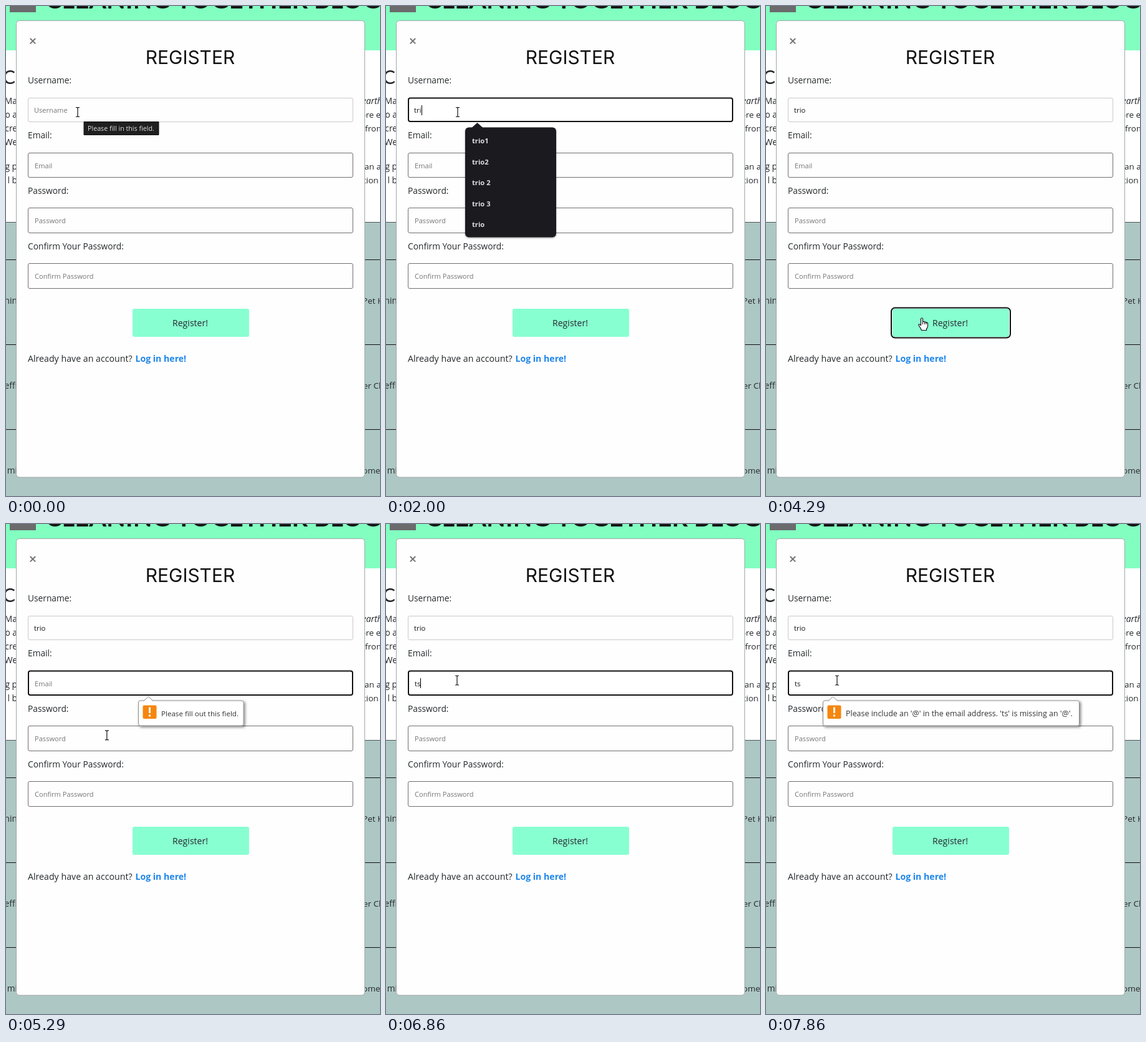
Write an HTML page with a canvas that moves like this. It is 600 px wide and 785 px high and loops after 8000 ms.

```html
<!DOCTYPE html>
<html lang="en">
<head>
<meta charset="utf-8">
<title>Register form</title>
<style>
  html, body { margin: 0; width: 100%; height: 100%; overflow: hidden; background: #fff; }
  canvas { display: block; width: 600px; height: 785px; }
</style>
</head>
<body>
<canvas id="stage" width="600" height="785"></canvas>
<script>
const ctx = document.getElementById('stage').getContext('2d');
const LOOP = 8000;
const TICKS_PER_SECOND = 7;
const BODY = '"Open Sans", "Noto Sans", sans-serif';
const HEADING = 'Lato, sans-serif';
const INK = '#24282b';

// Schedule in ticks
const FOCUS_NAME = 1, OPEN_NAMES = 2, PRESS = 29, SUBMIT = 31;
const OPEN_MAILS = 42, RESUBMIT = 49;
const NAME_KEYS = [11, 12, 14, 15], MAIL_KEYS = [45, 47];
const NAME = 'trio', MAIL = 'ts';
const MOUSE = [
  [0, 115, 170], [18, 115, 170], [21, 121, 512], [23, 130, 513],
  [25, 130, 513], [28, 250, 500], [34, 250, 500], [39, 114, 250.5]
];

const NAMES = ['TameldaC', 'trio1', 'DFenwold', 'LNova', 'trio2', 'KBrond', 'trio 2', 'trio 3', 'trio'];
const MAILS = ['trio1@t.example', 'tamelda.crawholt52@m.example', 'trio2@t.example',
  'trio3@t.example', 'dfenwold@t.example'];

const FIELDS = [
  { label: 'Username:', hint: 'Username', y: 147, h: 39, labelY: 124, border: '#c9c9c9' },
  { label: 'Email:', hint: 'Email', y: 235, h: 40, labelY: 212, border: '#707070' },
  { label: 'Password:', hint: 'Password', y: 323, h: 41, labelY: 301, border: '#707070' },
  { label: 'Confirm Your Password:', hint: 'Confirm Password', y: 412, h: 41, labelY: 389.5, border: '#707070' }
];

function text(str, x, y, size, { color = INK, weight = '400', family = BODY, align = 'left', spacing = 0 } = {}) {
  ctx.font = `${weight} ${size}px ${family}`;
  ctx.letterSpacing = spacing + 'px';
  ctx.textAlign = align;
  ctx.fillStyle = color;
  ctx.fillText(str, x, y);
}

function rect(x, y, w, h, color) {
  ctx.fillStyle = color;
  ctx.fillRect(x, y, w, h);
}

function box(x, y, w, h, r, fill, stroke, line = 1) {
  const inset = stroke ? line / 2 : 0;
  ctx.beginPath();
  ctx.roundRect(x + inset, y + inset, w - 2 * inset, h - 2 * inset, r);
  paint(fill, stroke, line);
}

function shape(points, fill, stroke, line = 1) {
  ctx.beginPath();
  points.forEach(([x, y]) => ctx.lineTo(x, y));
  ctx.closePath();
  paint(fill, stroke, line);
}

function paint(fill, stroke, line) {
  if (fill) { ctx.fillStyle = fill; ctx.fill(); }
  if (stroke) { ctx.strokeStyle = stroke; ctx.lineWidth = line; ctx.stroke(); }
}

function withShadow(color, blur, dx, dy, draw) {
  ctx.save();
  Object.assign(ctx, { shadowColor: color, shadowBlur: blur, shadowOffsetX: dx, shadowOffsetY: dy });
  draw();
  ctx.restore();
}

function drawPage() {
  rect(0, 0, 600, 785, '#fff');
  rect(0, 0, 600, 71, '#82ffc0');
  rect(6, 0, 42, 10, '#6b6a6c');
  text('CLEANING TOGETHER BLOG', 63, 3.5, 40, { weight: '700', family: HEADING, color: '#151515' });
  rect(0, 346, 600, 439, '#adc7c4');
  [346, 406, 542, 678].forEach(y => rect(0, y, 600, 1, y === 346 ? '#4a5553' : '#111'));

  text('C', -5, 125, 30, { family: HEADING });
  const left = [['Ma', 157], ['o a', 179], ['cre', 201], ['We', 223], ['g p', 262], ['l b', 284],
    ['nin', 477], ['effi', 613], ['mi', 749]];
  left.forEach(([s, y]) => text(s, 18, y, 13.8, { align: 'right' }));
  text('earth', 571, 157, 13.8, { weight: 'italic 400' });
  const right = [['ore e', 569, 179], ['from', 576, 201], ['an a', 575, 262], ['tion', 573, 284],
    ['Pet H', 572, 477], ['er Cl', 573, 613], ['ome', 572, 749]];
  right.forEach(([s, x, y]) => text(s, x, y, 13.5));
}

function drawModal() {
  box(16, 23, 560, 732.5, 5, '#fefefe', '#9fa8a6');
  ctx.beginPath();
  ctx.moveTo(38.8, 52); ctx.lineTo(47.2, 60.4);
  ctx.moveTo(47.2, 52); ctx.lineTo(38.8, 60.4);
  paint(null, '#747474', 2);
  text('REGISTER', 295.5, 92.5, 30, { family: 'Inter, sans-serif', align: 'center', color: '#111' });
  text('Already have an account?', 35, 570, 14.2);
  text('Log in here!', 207.5, 570, 14.1, { weight: '700', color: '#1f86ea' });
}

function drawField(field, value, focused, caret) {
  const { y, h } = field;
  const x = field === FIELDS[0] ? 45 : 46;
  const base = y + h / 2 + 4.5;
  text(field.label, 35, field.labelY, 13.75);
  if (focused) box(35, y - 0.5, 522, h + 0.5, 3, '#fff', '#111', 2);
  else box(35, y, 522, h, 2.5, '#fefefe', field.border);
  if (value) text(value, x, base, 11.4, { color: '#161616' });
  else text(field.hint, x, base, 11.1, { color: '#777' });
  if (caret) {
    ctx.font = `400 11.4px ${BODY}`;
    rect(Math.round(x + ctx.measureText(value).width), y + 12, 1, 16, '#000');
  }
}

function drawButton(pressed) {
  if (pressed) box(200, 482.5, 193, 50, 6, '#fff', '#111', 2);
  box(203, 485, 187, 45, 3, '#88ffd1');
  text('Register!', 295.5, 513, 14.1, { align: 'center' });
}

function drawTooltip() {
  box(124.5, 185, 121, 22, 0, '#1f1f1f', '#111');
  text('Please fill in this field.', 131, 200, 10.7, { color: '#e0e0e0' });
}

function drawSuggestions(items, top, width) {
  if (!items.length) return;
  const row = 33.6;
  withShadow('rgba(0,0,0,.4)', 3, 0, 1, () => box(127, top, width, items.length * row + 8, 6, '#1b1a1f'));
  shape([[137, top + 1], [146.5, top - 7.5], [156, top + 1]], '#1b1a1f');
  items.forEach((item, i) =>
    text(item, 138, top + 25.5 + i * row, 11.2, { weight: '700', color: '#dedee0' }));
}

function drawBubble(message, left, right, size, alpha) {
  const top = 282.5, tip = left + 16.5;
  ctx.save();
  ctx.globalAlpha = alpha;
  withShadow('rgba(0,0,0,.5)', 4, 2, 2, () => box(left, top, right - left, 41, 3, '#fff'));
  box(left, top, right - left, 41, 3, '#fff', '#8e8e8e');
  shape([[tip - 7, top + 1.5], [tip, top - 6], [tip + 7, top + 1.5]], '#fff');
  ctx.beginPath();
  ctx.moveTo(tip - 7, top + 0.5); ctx.lineTo(tip, top - 6); ctx.lineTo(tip + 7, top + 0.5);
  paint(null, '#8e8e8e', 1);
  box(left + 7.5, 290.5, 22, 21.5, 2, '#f5860f');
  rect(left + 17, 293.5, 3, 9.5, '#fff');
  rect(left + 17, 305.5, 3, 3, '#fff');
  text(message, left + 37, 307.5, size, { color: '#333' });
  ctx.restore();
}

function drawIBeam(x, y) {
  ctx.beginPath();
  for (const end of [-1, 1]) {
    ctx.moveTo(x - 3, y + end * 7.5);
    ctx.lineTo(x - 1, y + end * 7.5);
    ctx.lineTo(x, y + end * 6.5);
    ctx.lineTo(x + 1, y + end * 7.5);
    ctx.lineTo(x + 3, y + end * 7.5);
  }
  ctx.moveTo(x, y - 6.5);
  ctx.lineTo(x, y + 6.5);
  paint(null, '#111', 1.2);
}

function drawArrow(x, y) {
  const outline = [[0, 0], [0, 12], [2.7, 9.6], [4.8, 14.5], [6.8, 13.6], [4.8, 8.9], [8.3, 8.6]];
  shape(outline.map(([dx, dy]) => [x + dx, y + dy]), '#0a0a0a', '#fff', 0.5);
}

function drawHand(x, y) {
  ctx.save();
  ctx.translate(x, y);
  ctx.beginPath();
  ctx.moveTo(-1.5, 12);
  ctx.lineTo(-1.5, 1);
  ctx.quadraticCurveTo(0, -1.5, 1.5, 1);
  ctx.lineTo(1.5, 6);
  ctx.quadraticCurveTo(3.5, 4.5, 4.5, 6.5);
  ctx.quadraticCurveTo(6.5, 5.5, 7, 7.5);
  ctx.quadraticCurveTo(9.5, 6.5, 9.5, 9);
  ctx.lineTo(9.5, 13);
  ctx.quadraticCurveTo(9, 16, 7.5, 17);
  ctx.lineTo(7.5, 19.5);
  ctx.lineTo(-0.5, 19.5);
  ctx.quadraticCurveTo(-2, 16, -5, 11.5);
  ctx.quadraticCurveTo(-5.5, 8, -1.5, 11.5);
  ctx.closePath();
  paint('#fff', '#111', 1.2);
  ctx.beginPath();
  for (const dx of [1.5, 4.5, 7]) {
    ctx.moveTo(dx, 6.5);
    ctx.lineTo(dx, 10);
  }
  paint(null, '#111', 1);
  ctx.restore();
}

function mouseAt(tick) {
  const next = MOUSE.findIndex(([at]) => at > tick);
  if (next < 0) return MOUSE.at(-1).slice(1);
  const [t0, x0, y0] = MOUSE[next - 1];
  const [t1, x1, y1] = MOUSE[next];
  const p = (tick - t0) / (t1 - t0);
  const ease = p * p * (3 - 2 * p);
  return [x0 + (x1 - x0) * ease, y0 + (y1 - y0) * ease];
}

function drawMouse(tick, covered) {
  const [x, y] = mouseAt(tick);
  const overButton = x > 203 && x < 390 && y > 485 && y < 530;
  const overField = FIELDS.some(f => y > f.y && y < f.y + f.h) && !(covered && x > 127 && y > 194);
  const draw = overButton ? drawHand : overField ? drawIBeam : drawArrow;
  draw(x, y);
}

const typed = (word, keys, tick) => word.slice(0, keys.filter(k => k <= tick).length);
const matching = (list, prefix) => list.filter(s => s.toLowerCase().startsWith(prefix)).slice(0, 6);
const fade = age => Math.min(1, 0.2 + 0.4 * age);

function caretOn(tick) {
  const resets = [FOCUS_NAME, ...NAME_KEYS, SUBMIT, ...MAIL_KEYS, RESUBMIT];
  const last = resets.filter(k => k <= tick).at(-1);
  return Math.floor((tick - last) / 3.5) % 2 === 0;
}

function draw(tick) {
  const name = typed(NAME, NAME_KEYS, tick);
  const mail = typed(MAIL, MAIL_KEYS, tick);
  const focus = tick < FOCUS_NAME ? -1 : tick < PRESS ? 0 : tick < SUBMIT ? -1 : 1;
  const namesOpen = tick >= OPEN_NAMES && tick < PRESS;
  const mailsOpen = tick >= OPEN_MAILS && tick < RESUBMIT;

  drawPage();
  drawModal();
  FIELDS.forEach((field, i) =>
    drawField(field, [name, mail][i] || '', i === focus, i === focus && caretOn(tick)));
  drawButton(tick >= PRESS && tick < SUBMIT);

  if (tick < FOCUS_NAME) drawTooltip();
  if (tick >= SUBMIT && !mail) {
    drawBubble('Please fill out this field.', 212, 381.5, 11.6, fade(tick - SUBMIT));
  }
  if (tick >= RESUBMIT) {
    const settled = tick > RESUBMIT + 1;
    drawBubble("Please include an '@' in the email address. 'ts' is missing an '@'.",
      91, settled ? 503 : 493, settled ? 12.45 : 12.15, fade(tick - RESUBMIT));
  }
  if (namesOpen) drawSuggestions(matching(NAMES, name), 194.5, 146);
  if (mailsOpen) drawSuggestions(matching(MAILS, mail), 283, 226);
  drawMouse(tick, namesOpen);
}

function frame() {
  const time = performance.now() % LOOP;
  draw(Math.floor((time + 4) * TICKS_PER_SECOND / 1000) % (LOOP * TICKS_PER_SECOND / 1000));
  requestAnimationFrame(frame);
}
frame();
</script>
</body>
</html>
```
